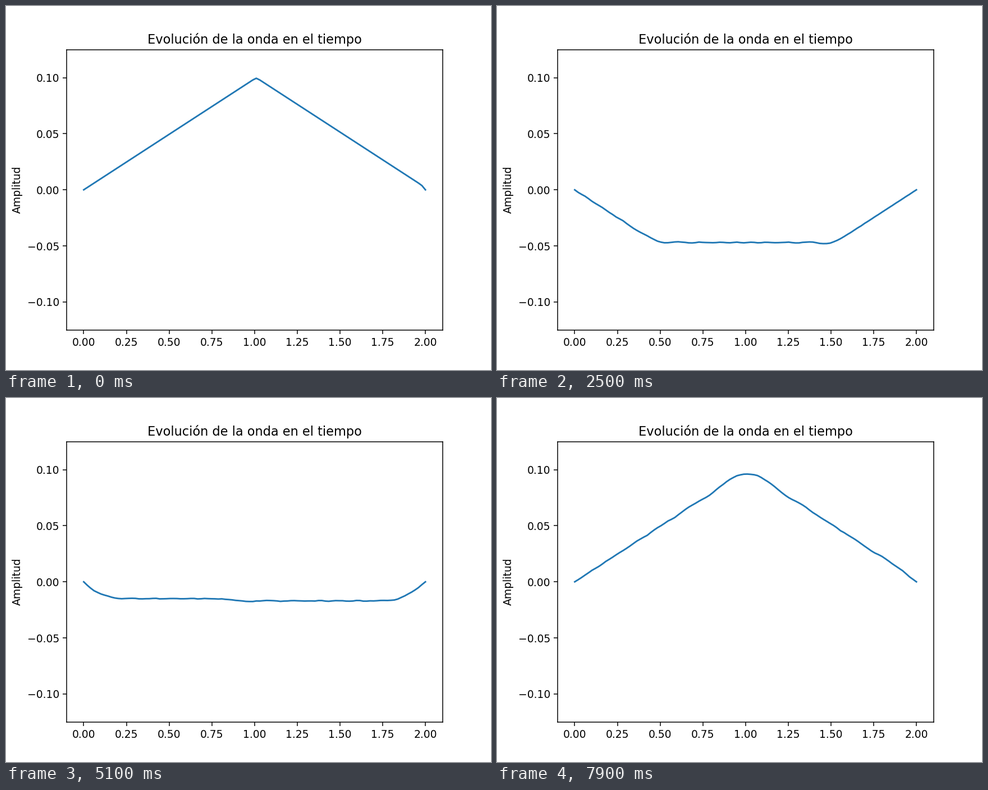
A matplotlib script for the animation above (8 s loop, 864 by 648 pixels).

```python
import numpy as np
import matplotlib.pyplot as plt
from matplotlib.animation import FuncAnimation

LENGTH, POINTS = 2.0, 100
SPEED, DT = 1.0, 0.01
HEIGHT = 0.1
FRAMES, INTERVAL, STEPS_PER_FRAME = 80, 100, 10

dx = LENGTH / POINTS
r2 = (SPEED * DT / dx) ** 2


def bend(u):
    """Second difference, zero at the fixed ends."""
    out = np.zeros_like(u)
    out[1:-1] = u[2:] - 2 * u[1:-1] + u[:-2]
    return out


def simulate():
    """Plucked string released from rest, explicit finite differences."""
    pos = np.arange(POINTS) * dx
    prev = HEIGHT * (1 - np.abs(2 * pos / LENGTH - 1))
    prev[0] = prev[-1] = 0
    cur = prev + 0.5 * r2 * bend(prev)
    shapes = [cur]
    for step in range(1, (FRAMES - 1) * STEPS_PER_FRAME + 1):
        prev, cur = cur, 2 * cur - prev + r2 * bend(cur)
        if step % STEPS_PER_FRAME == 0:
            shapes.append(cur)
    return shapes


shapes = simulate()
x = np.linspace(0, LENGTH, POINTS)

fig, ax = plt.subplots(figsize=(6.4, 4.8), dpi=135)
line, = ax.plot(x, shapes[0])
ax.set_ylim(-1.25 * HEIGHT, 1.25 * HEIGHT)
ax.set_title("Evolución de la onda en el tiempo")
ax.set_ylabel("Amplitud")


def update(i):
    line.set_ydata(shapes[i])
    return line,


anim = FuncAnimation(fig, update, frames=FRAMES, interval=INTERVAL,
                     repeat=True, repeat_delay=0)
plt.show()
```
